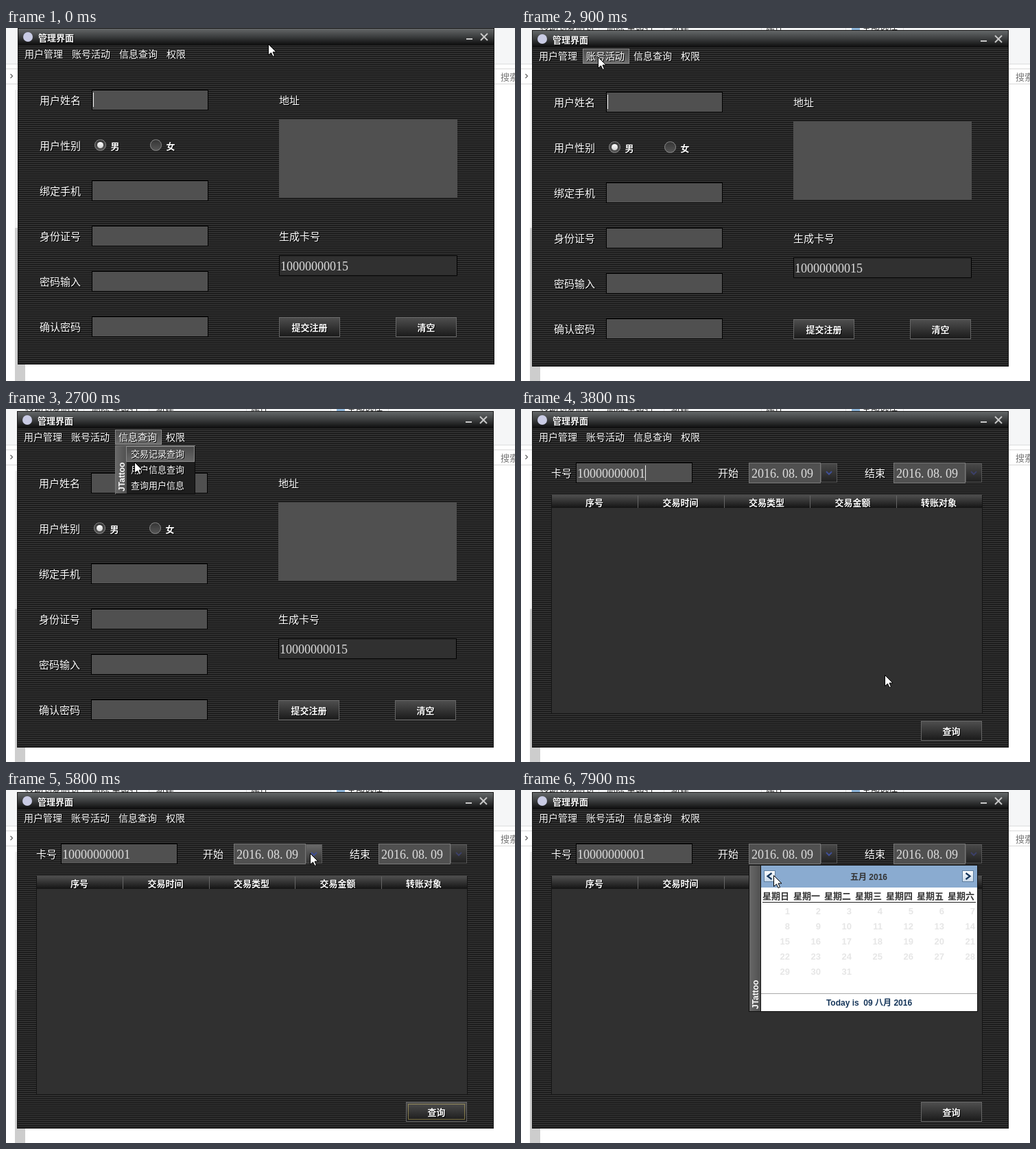
These frames come from a looping animation (742 by 514 pixels, 8000 ms). An HTML page with a canvas:

```html
<!DOCTYPE html>
<html lang="zh">
<head>
<meta charset="utf-8">
<title>管理界面</title>
<style>
html, body { margin: 0; width: 100%; height: 100%; overflow: hidden; background: #fff; }
canvas { display: block; }
</style>
</head>
<body>
<canvas id="stage" width="742" height="514"></canvas>
<script>
const ctx = document.getElementById('stage').getContext('2d');
const LOOP = 8000, STEP = 100;
const CJK = '"Noto Sans CJK SC", "Noto Sans CJK", sans-serif';
const LATIN = '"Liberation Sans", ' + CJK;
const SERIF = '"Liberation Serif", serif';

// Pointer path: time, x, y
const PATH = [
  [0, 382, 23], [200, 380, 26], [300, 380, 26], [900, 112, 42], [1600, 112, 42],
  [1800, 122, 68], [2000, 122, 68], [2300, 183, 42], [2500, 183, 42], [2700, 187, 77],
  [2900, 187, 77], [3100, 195, 84], [3200, 195, 84], [3400, 192, 111], [3500, 192, 111],
  [3800, 530, 387], [4400, 625, 462], [5300, 625, 462], [5800, 443, 92], [6000, 443, 92],
  [6300, 462, 160], [6600, 484, 129], [6700, 484, 129], [6900, 522, 126], [7100, 522, 126],
  [7500, 368, 124], [LOOP, 368, 124]
];

const MENUS = [['用户管理', 26], ['账号活动', 95], ['信息查询', 164], ['权限', 233]];
const MONTHS = '一二三四五六七八';

const between = (t, a, b) => t >= a && t < b;

function pointer(t) {
  const i = PATH.findIndex(p => p[0] > t);
  const a = PATH[i - 1], b = PATH[i];
  const k = (t - a[0]) / (b[0] - a[0]);
  return [Math.round(a[1] + (b[1] - a[1]) * k), Math.round(a[2] + (b[2] - a[2]) * k)];
}

function rect(x, y, w, h, fill) {
  ctx.fillStyle = fill;
  ctx.fillRect(x, y, w, h);
}

function frame(x, y, w, h, color) {
  ctx.strokeStyle = color;
  ctx.lineWidth = 1;
  ctx.strokeRect(x + 0.5, y + 0.5, w - 1, h - 1);
}

function fade(y, h, ...colors) {
  const g = ctx.createLinearGradient(0, y, 0, y + h);
  colors.forEach((c, i) => g.addColorStop(i / (colors.length - 1), c));
  return g;
}

function line(points, color, width = 1) {
  ctx.beginPath();
  points.forEach(([x, y]) => ctx.lineTo(x, y));
  ctx.strokeStyle = color;
  ctx.lineWidth = width;
  ctx.stroke();
}

// y is the vertical middle of the glyphs
function text(str, x, y, { size = 13, weight = 400, color = '#fff', align = 'left', family = CJK, shadow = false } = {}) {
  ctx.font = `${weight} ${size}px ${family}`;
  ctx.textAlign = align;
  const base = Math.round(y + size * 0.37);
  if (shadow) {
    ctx.fillStyle = '#000';
    ctx.fillText(str, x + 1, base + 1);
  }
  ctx.fillStyle = color;
  ctx.fillText(str, x, base);
}

const label = (str, x, y) => text(str, x, y, { size: 15, weight: 500, shadow: true });
const bold = (str, x, y, align = 'left') => text(str, x, y, { weight: 700, shadow: true, align });

function digits(str, x, y) {
  [...str].forEach((c, i) => text(c, x + i * 9, y, { size: 18, color: '#dedede', family: SERIF }));
}

function field(x, y, w, h, fill = '#505050', edge = '#000') {
  rect(x, y, w, h, fill);
  frame(x, y, w, h, edge);
}

function button(str, x, y, { hover, pressed, focus } = {}) {
  const w = 89, h = 29;
  const colors = pressed ? ['#181818', '#3a3a3a'] : hover ? ['#707070', '#303030'] : ['#505050', '#191919'];
  rect(x, y, w, h, fade(y, h, ...colors));
  frame(x, y, w, h, '#666');
  if (focus) {
    ctx.setLineDash([1, 1]);
    frame(x + 3, y + 3, w - 6, h - 6, '#d8c468');
    ctx.setLineDash([]);
  }
  bold(str, x + w / 2, y + h / 2 + 1, 'center');
}

function backdrop() {
  rect(0, 0, 742, 514, '#fff');
  rect(0, 0, 742, 52, '#f5f6f7');
  rect(0, 52, 742, 1, '#dcddde');
  for (const y of [59, 81]) rect(0, y, 742, 1, '#d9d9d9');
  line([[6.5, 67], [9.5, 70], [6.5, 73]], '#666', 1.3);
  text('搜索', 721, 71, { color: '#777' });
  const tools = [['移动到复制到', 28], ['删除 重命名', 125], ['新建', 219], ['属性', 357], ['全部选择', 497]];
  for (const [str, x] of tools) text(str, x, -2, { color: '#333' });
  for (const x of [113, 208, 350, 473, 557]) rect(x, 0, 1, 4, '#dcdcdc');
  rect(482, 0, 12, 3, '#8db4d8');
  rect(13, 90, 15, 201, '#f0f0f0');
  rect(13, 291, 15, 223, '#cdcdcd');
}

function chrome() {
  rect(16, 3, 695, 490, '#303030');
  for (let y = 29; y < 492; y += 3) rect(16, y, 695, 1, '#131313');
  rect(16, 3, 695, 25, fade(3, 25, '#686b6c', '#3c3e3f', '#0c0c0c'));
  frame(16, 3, 695, 490, '#171717');
  rect(17, 490, 693, 2, '#222');
  ctx.beginPath();
  ctx.arc(31, 16, 7, 0, 7);
  ctx.fillStyle = '#c9cbe4';
  ctx.fill();
  bold('管理界面', 46, 17);
  rect(670, 18, 9, 2, '#c8c8c8');
  line([[691, 11], [701, 21]], '#c8c8c8', 2);
  line([[701, 11], [691, 21]], '#c8c8c8', 2);
}

function menuBar(active) {
  MENUS.forEach(([str, x], i) => {
    if (i === active) {
      const w = str.length * 14 + 12;
      rect(x - 5, 30, w, 22, fade(30, 22, '#4c4c4c', '#707070'));
      frame(x - 5, 30, w, 22, '#8a8a8a');
    }
    text(str, x, 41, { size: 14, shadow: true });
  });
}

function strip(x, y, h) {
  const g = ctx.createLinearGradient(x, 0, x + 16, 0);
  g.addColorStop(0, '#686868');
  g.addColorStop(1, '#505050');
  rect(x, y, 16, h, g);
  ctx.save();
  ctx.translate(x + 9, y + h - 3);
  ctx.rotate(-Math.PI / 2);
  text('JTattoo', 0, 0, { size: 12, weight: 700, family: LATIN });
  ctx.restore();
}

function popup(x, w, items, hover) {
  const h = items.length * 23 + 2;
  rect(x, 53, w, h, '#1e1e1e');
  strip(x + 1, 54, h - 2);
  frame(x, 53, w, h, '#0a0a0a');
  rect(x, 53, w, 1, '#777');
  rect(x, 53, 1, h, '#777');
  items.forEach((str, i) => {
    const y = 54 + i * 23;
    if (i === hover) {
      rect(x + 16, y, w - 17, 23, fade(y, 23, '#484848', '#686868'));
      frame(x + 16, y, w - 17, 23, '#8a8a8a');
    }
    text(str, x + 23, y + 11, { shadow: true });
  });
}

function radio(str, x, on) {
  ctx.beginPath();
  ctx.arc(x, 173.5, 8, 0, 7);
  ctx.fillStyle = fade(165, 16, '#333', '#555');
  ctx.fill();
  ctx.strokeStyle = '#8c8c8c';
  ctx.lineWidth = 1;
  ctx.stroke();
  if (on) {
    ctx.beginPath();
    ctx.arc(x, 173.5, 4.5, 0, 7);
    ctx.fillStyle = fade(169, 10, '#fff', '#ccc');
    ctx.fill();
  }
  bold(str, x + 15, 175);
}

function registerForm(t) {
  ['用户姓名', '用户性别', '绑定手机', '身份证号', '密码输入', '确认密码'].forEach((str, i) => {
    label(str, 48, 108 + i * 66);
    if (i !== 1) field(124, 93 + i * 66, 170, 30);
  });
  radio('男', 136.5, true);
  radio('女', 217.5, false);
  if (t < 400 || between(t, 800, 1300)) rect(126, 97, 1, 21, '#eee');
  label('地址', 397, 108);
  rect(397, 136, 260, 114, '#505050');
  label('生成卡号', 397, 306);
  field(397, 334, 260, 30, '#303030');
  digits('10000000015', 399, 349);
  button('提交注册', 397, 424);
  button('清空', 567, 424);
}

function dateBox(x, arrowColor, hover) {
  field(x, 78, 105, 30, '#505050', '#777');
  digits('2016.08.09', x + 4, 93);
  rect(x + 105, 79, 24, 28, fade(79, 28, ...(hover ? ['#6c6c6c', '#303030'] : ['#4a4a4a', '#202020'])));
  frame(x + 105, 79, 24, 28, '#585858');
  line([[x + 113, 91], [x + 117, 95], [x + 121, 91]], arrowColor, 2);
}

function queryForm(t) {
  label('卡号', 44, 93);
  field(80, 78, 170, 30);
  const typed = t >= 3600;
  if (typed) digits('10000000001', 82, 93);
  if (between(t, 3300, 4300)) rect(typed ? 181 : 82, 82, 1, 22, '#eee');
  label('开始', 287, 93);
  dateBox(332, '#3f4f96', between(t, 5800, 6100));
  label('结束', 501, 93);
  dateBox(543, '#3c4068', false);

  rect(44, 125, 629, 319, '#303030');
  frame(44, 125, 629, 319, '#141414');
  rect(45, 125, 627, 19, fade(125, 19, '#505050', '#141414'));
  ['序号', '交易时间', '交易类型', '交易金额', '转账对象'].forEach((str, i) => {
    const x = 45 + i * 125.5;
    if (i) rect(Math.floor(x), 126, 1, 18, '#666');
    bold(str, x + 62, 136, 'center');
  });
  button('查询', 583, 454, {
    hover: between(t, 4400, 5500),
    pressed: t === 4500,
    focus: between(t, 4500, 5900)
  });
}

function navButton(x, dir) {
  rect(x, 117, 17, 17, fade(117, 17, '#fff', '#c4d6e8'));
  frame(x, 117, 17, 17, '#5f7f9f');
  const c = x + 8.5;
  line([[c - 3 * dir, 121], [c + 3 * dir, 125.5], [c - 3 * dir, 130]], '#16365a', 2.2);
}

function calendar(month) {
  const first = new Date(2016, month - 1, 1).getDay();
  const days = new Date(2016, month, 0).getDate();
  rect(332, 109, 334, 214, '#fff');
  strip(333, 110, 212);
  rect(349, 109, 1, 214, '#111');
  rect(350, 110, 315, 32, '#8aabd0');
  frame(332, 109, 334, 214, '#111');
  navButton(354, -1);
  navButton(643, 1);
  const style = { size: 12, weight: 700, color: '#333', align: 'center', family: LATIN };
  text(MONTHS[month - 1] + '月 2016', 507, 127, style);
  [...'日一二三四五六'].forEach((c, i) => text('星期' + c, 352 + i * 45, 154, { weight: 700, color: '#333' }));
  rect(352, 163, 311, 1, '#222');
  for (let d = 1; d <= days; d++) {
    const cell = first + d - 1, x = 392 + cell % 7 * 45, y = 176 + Math.floor(cell / 7) * 22;
    if (month === 8 && d === 9) rect(x - 42, y - 12, 45, 22, '#c3daee');
    text(String(d), x, y, { weight: 700, color: '#e6e6e6', align: 'right', family: LATIN });
  }
  rect(350, 296, 315, 1, '#aaa');
  text('Today is  09 八月 2016', 507.5, 310, { ...style, color: '#16365a' });
}

function arrow(x, y) {
  ctx.save();
  ctx.translate(x + 0.5, y + 0.5);
  ctx.beginPath();
  [[0, 0], [0, 16], [4, 12.5], [6.5, 18], [9, 17], [6.5, 11.5], [11.5, 11.5]].forEach(p => ctx.lineTo(...p));
  ctx.closePath();
  ctx.fillStyle = '#fff';
  ctx.fill();
  ctx.strokeStyle = '#000';
  ctx.lineWidth = 1;
  ctx.stroke();
  ctx.restore();
}

function draw(t) {
  backdrop();
  ctx.save();
  if (t < 200) ctx.translate(1, t < 100 ? -3 : -1);
  chrome();
  menuBar(between(t, 900, 2200) ? 1 : between(t, 2200, 3000) ? 2 : -1);
  if (t < 3100) registerForm(t);
  else queryForm(t);
  ctx.restore();

  if (between(t, 1500, 2200)) popup(89, 110, ['用户存取款', '用户间转账'], between(t, 1800, 2100) ? 0 : -1);
  if (between(t, 2200, 3000)) popup(159, 117, ['交易记录查询', '用户信息查询', '查询用户信息'], t >= 2700 ? 0 : -1);
  if (t >= 5900) calendar(t < 7500 ? 8 : t < 7700 ? 7 : t < 7900 ? 6 : 5);
  arrow(...pointer(t));
}

let shown = -1;
function tick() {
  const t = Math.floor(performance.now() % LOOP / STEP) * STEP;
  if (t !== shown) draw(shown = t);
  requestAnimationFrame(tick);
}
tick();
</script>
</body>
</html>
```
